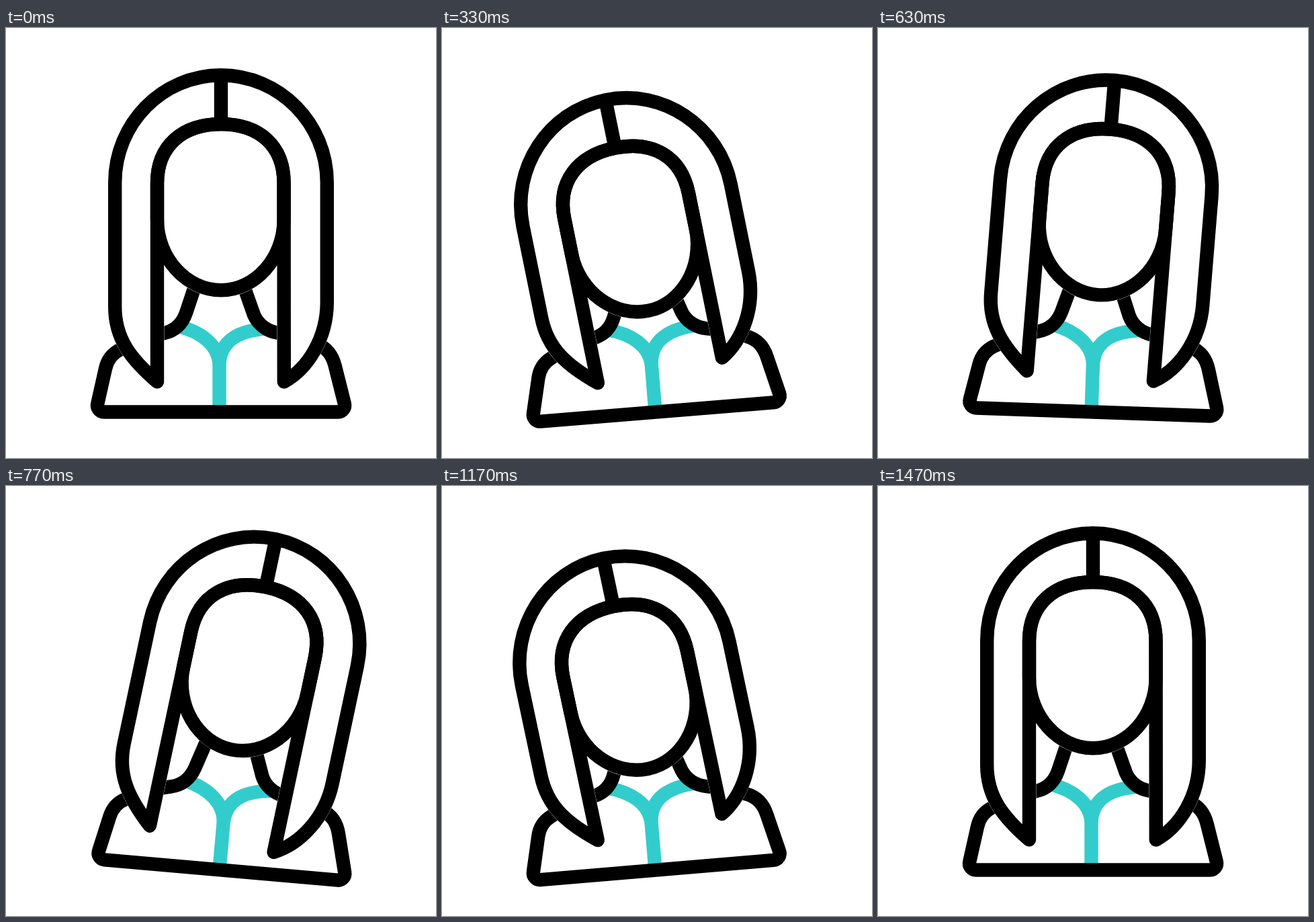
An HTML page with a canvas for the animation above (2000 ms loop, 640 by 640 pixels).

```html
<!DOCTYPE html>
<html lang="en">
<head>
<meta charset="utf-8">
<title>Head shake</title>
<style>
  html, body { margin: 0; width: 100%; height: 100%; overflow: hidden; background: #fff; }
  canvas { display: block; width: 640px; height: 640px; }
</style>
</head>
<body>
<canvas id="stage" width="640" height="640"></canvas>
<script>
const ctx = document.getElementById('stage').getContext('2d');
const LINE = 20.4;
const FPS = 30;
const LOOP = 2000;

// Keys are [frame, value] pairs
const TILT = [[0, 0], [12, -12.4], [23, 12], [33.85, -12.4], [44, 0]];
const SWAY = [[0, 0], [12, -5], [23, 5], [33.85, -5], [44, 0]];
const DROP = [[0, 0], [11.3, 30.2], [22.3, 0], [33.8, 30.2], [44, 0]];
const LIFT = [[0, 0], [12, 49.5], [23, 0], [33.85, 49.5], [44, 0]];

const bodyOutline = new Path2D(
  'M186 471 L170 478.5 C159 484 151 493 148 507 L136.3 559 ' +
  'A10 10 0 0 0 146 571.5 H494 A10 10 0 0 0 503.8 559 ' +
  'L490 504 C486 487 478 476 462 470 L440 461');
const neck = new Path2D(
  'M286 370 L279 391 L268 424 C262 441 250 451 235 454.3 L212 460 ' +
  'M349 370 L357 393 L369 427 C375 441 388 451 404 453.7 L428 458');
const collar = new Path2D(
  'M257 444 C290 452 317.5 472 317.5 503 V571 ' +
  'M388 447.5 C350 450 317.5 463 317.5 503');
const face = new Path2D(
  'M225 285 V231 C225 176 262 143 320 143 S413.6 176 413.6 231 V285 ' +
  'C413.6 343 371 390.3 320 390.3 S225 343 225 285 Z');
const parting = new Path2D('M320 70 V143');

// The lower part of the hair slides up by `lift`
function hairPath(lift) {
  const y = v => v - lift;
  return new Path2D(
    `M225 231 V${y(526.5)} C185 ${y(492)} 162.2 ${y(462)} 162.2 ${y(415)} ` +
    `V230 C162.2 142 232.8 70.2 320 70.2 S477.8 142 477.8 230 V${y(408)} ` +
    `C477.8 ${y(462)} 449 ${y(507)} 413.8 ${y(526.5)} L413.6 231 ` +
    'C413.6 176 378 143 320 143 S225 176 225 231 Z');
}

function valueAt(keys, frame) {
  for (let i = 1; i < keys.length; i++) {
    const [start, from] = keys[i - 1];
    const [end, to] = keys[i];
    if (frame <= end) {
      const t = (frame - start) / (end - start);
      return from + (to - from) * t * t * (3 - 2 * t);
    }
  }
  return keys[keys.length - 1][1];
}

function stroke(path, color = '#000', width = LINE) {
  ctx.strokeStyle = color;
  ctx.lineWidth = width;
  ctx.stroke(path);
}

function rotateAbout(x, y, degrees) {
  ctx.translate(x, y);
  ctx.rotate(degrees * Math.PI / 180);
  ctx.translate(-x, -y);
}

function drawBody(sway) {
  ctx.save();
  rotateAbout(320, 571.3, sway);
  stroke(collar, '#33cccc');
  stroke(bodyOutline);
  stroke(neck);
  ctx.restore();
}

function drawHead(tilt, drop, lift) {
  const hair = hairPath(lift);
  ctx.save();
  ctx.translate(drop * 0.05, drop);
  rotateAbout(320, 463, tilt);
  ctx.fillStyle = '#fff';
  for (const shape of [hair, face]) {
    ctx.fill(shape);
    stroke(shape, '#fff', LINE + 0.5);
  }
  [hair, face, parting].forEach(shape => stroke(shape));
  ctx.restore();
}

function render(now) {
  const frame = Math.floor(((now % LOOP) + 4) * FPS / 1000) % 60;
  ctx.fillStyle = '#fff';
  ctx.fillRect(0, 0, 640, 640);
  ctx.lineJoin = 'round';
  drawBody(valueAt(SWAY, frame));
  drawHead(valueAt(TILT, frame), valueAt(DROP, frame), valueAt(LIFT, frame));
}

let origin;
function tick(now) {
  origin ??= now;
  render(now - origin);
  requestAnimationFrame(tick);
}
render(0);
requestAnimationFrame(tick);
</script>
</body>
</html>
```
